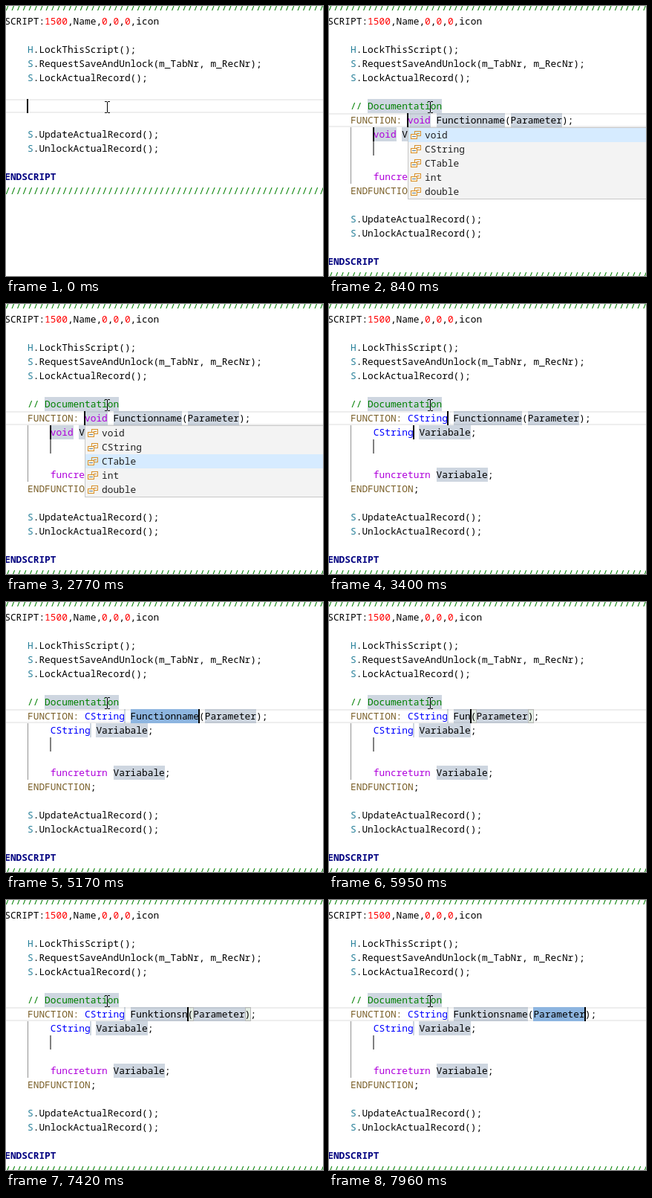
An HTML page with a canvas for the animation above (8 s loop, 427 by 363 pixels).

```html
<!DOCTYPE html>
<html lang="en">
<head>
<meta charset="utf-8">
<title>Snippet completion in a code editor</title>
<style>
html, body { margin: 0; width: 100%; height: 100%; overflow: hidden; background: #fff; }
canvas { display: block; }
</style>
</head>
<body>
<canvas id="stage" width="427" height="363"></canvas>
<script>
const g = document.getElementById('stage').getContext('2d');
const LOOP = 8000, W = 427, H = 363, CHAR = 7.7, LINE = 19;
const FONT = '12.833px "Noto Sans Mono", "DejaVu Sans Mono", monospace';
const BLACK = '#000', RED = '#f00', GREEN = '#008000', TEAL = '#267f99', OLIVE = '#795e26',
      PURPLE = '#af00db', BLUE = '#00f', NAVY = '#000080', FIELD = 'rgba(10,50,100,.2)';

const SNIPPET = 840, ACCEPT = 3400, SELECT_NAME = 4170, SELECT_PARAM = 7960;
const BLINKS = [70, 520, 1300, 1760, 2230, 2770, 3230, ACCEPT, 3930, SELECT_NAME, 4710, 5170];
const KEYS = [5570, 5800, 5950, 6410, 6580, 6650, 6730, 6810, 6960, 7420, 7500, 7650, 7730];
const TYPES = ['void', 'CString', 'CTable', 'int', 'double'];

const colX = col => col * CHAR - 1.8;
const rowY = row => row * LINE - 8;
const passed = (times, t) => times.filter(x => x <= t).length;

function rect(x, y, w, h, color) {
  g.fillStyle = color;
  g.fillRect(x, y, w, h);
}

function textAt(x, y, color, text) {
  g.fillStyle = color;
  [...text].forEach((c, i) => g.fillText(c, x + i * CHAR, y));
}

// parts alternate between colour and text
function put(row, col, ...parts) {
  for (let i = 0; i < parts.length; i += 2) {
    textAt(colX(col), rowY(row) + 14, parts[i], parts[i + 1]);
    col += parts[i + 1].length;
  }
}

function mark(row, col, len, color = FIELD) {
  const x = Math.round(colX(col));
  rect(x, rowY(row), Math.round(colX(col + len)) - x, LINE, color);
}

function caret(row, col, color = BLACK) {
  rect(Math.floor(colX(col) - .5), rowY(row), 2, LINE, color);
}

function bracket(row, col) {
  mark(row, col, 1, 'rgba(0,100,0,.1)');
  g.strokeStyle = '#b9b9b9';
  g.strokeRect(Math.round(colX(col)) + .5, rowY(row) + .5, 7, LINE - 1);
}

function currentLine(row) {
  rect(0, rowY(row), W, 2, '#eee');
  rect(0, rowY(row) + 17, W, 2, '#eee');
}

function icon(x, y) {
  g.strokeStyle = '#d9902a';
  g.strokeRect(x + 5.5, y + .5, 8, 6);
  rect(x + 8, y + 3, 4, 1, '#d9902a');
  rect(x, y + 4, 9, 7, '#fff3dc');
  g.strokeRect(x + .5, y + 4.5, 8, 6);
  rect(x + 2, y + 7, 5, 1, '#5b7fa8');
}

function popup(selected) {
  rect(106, 163, W, 97, '#c8c8c8');
  rect(107, 164, W, 95, '#f3f3f3');
  TYPES.forEach((name, i) => {
    const y = 164 + i * LINE;
    if (i === selected) rect(107, y, W, LINE, '#d6ebff');
    icon(110, y + 4);
    textAt(129, y + 14, '#222', name);
  });
}

function pointer() {
  rect(136, 129, 1, 14, BLACK);
  for (const y of [128, 143]) {
    rect(133, y, 3, 1, BLACK);
    rect(137, y, 3, 1, BLACK);
  }
}

function header() {
  put(0, 0, GREEN, '/'.repeat(56));
  put(1, 0, BLACK, 'SCRIPT:', RED, '1500', BLACK, ',Name,', RED, '0', BLACK, ',',
      RED, '0', BLACK, ',', RED, '0', BLACK, ',icon');
  put(3, 4, TEAL, 'H', BLACK, '.LockThisScript();');
  put(4, 4, TEAL, 'S', BLACK, '.RequestSaveAndUnlock(m_TabNr, m_RecNr);');
  put(5, 4, TEAL, 'S', BLACK, '.LockActualRecord();');
}

function footer(row) {
  put(row, 4, TEAL, 'S', BLACK, '.UpdateActualRecord();');
  put(row + 1, 4, TEAL, 'S', BLACK, '.UnlockActualRecord();');
  g.font = 'bold ' + FONT;
  put(row + 3, 0, NAVY, 'ENDSCRIPT');
  g.font = FONT;
  put(row + 4, 0, GREEN, '/'.repeat(56));
}

function snippet(t, on) {
  const accepted = t >= ACCEPT;
  const type = accepted ? 'CString' : 'void', typeColor = accepted ? BLUE : PURPLE;
  const typed = passed(KEYS, t);
  const name = typed ? 'Funktionsname'.slice(0, typed) : 'Functionname';
  const nameCol = 15 + type.length, open = nameCol + name.length, close = open + 10;
  const naming = t >= SELECT_NAME && t < SELECT_PARAM;

  currentLine(8);
  rect(29, rowY(9), 1, 4 * LINE, '#939393');
  if (naming && !typed) mark(8, nameCol, name.length, '#add6ff');
  if (t >= SELECT_PARAM) mark(8, open + 1, 9, '#add6ff');

  mark(7, 7, 13);
  mark(8, nameCol, name.length);
  mark(8, open + 1, 9);
  mark(9, 9 + type.length, 9);
  mark(12, 19, 9);
  if (accepted) {
    caret(8, 21, FIELD);
    caret(9, 15, FIELD);
  } else {
    mark(8, 14, 4);
    mark(9, 8, 4);
  }
  if (naming && typed) {
    bracket(8, open);
    bracket(8, close);
  }

  put(7, 4, GREEN, '// Documentation');
  put(8, 4, OLIVE, 'FUNCTION: ', typeColor, type, BLACK, ` ${name}(Parameter);`);
  put(9, 8, typeColor, type, BLACK, ' Variabale;');
  put(12, 8, PURPLE, 'funcreturn', BLACK, ' Variabale;');
  put(13, 4, OLIVE, 'ENDFUNCTION', BLACK, ';');
  caret(10, 8, '#808080');

  if (on) {
    if (t >= SELECT_PARAM) caret(8, close);
    else if (naming) caret(8, open);
    else {
      caret(8, accepted ? 21 : 14);
      caret(9, accepted ? 15 : 8);
    }
  }
  if (!accepted) popup(t < 2160 ? 0 : t >= 2310 && t < 3000 ? 2 : 1);
}

function draw(t) {
  const on = passed(BLINKS, t) % 2 === 0;
  rect(0, 0, W, H, '#fff');
  g.font = FONT;
  g.lineWidth = 1;
  header();
  if (t < SNIPPET) {
    currentLine(7);
    if (on) caret(7, 4);
    footer(9);
  } else {
    footer(15);
    snippet(t, on);
  }
  pointer();
}

const start = performance.now();
function tick() {
  draw((performance.now() - start) % LOOP);
  requestAnimationFrame(tick);
}
tick();
</script>
</body>
</html>
```
